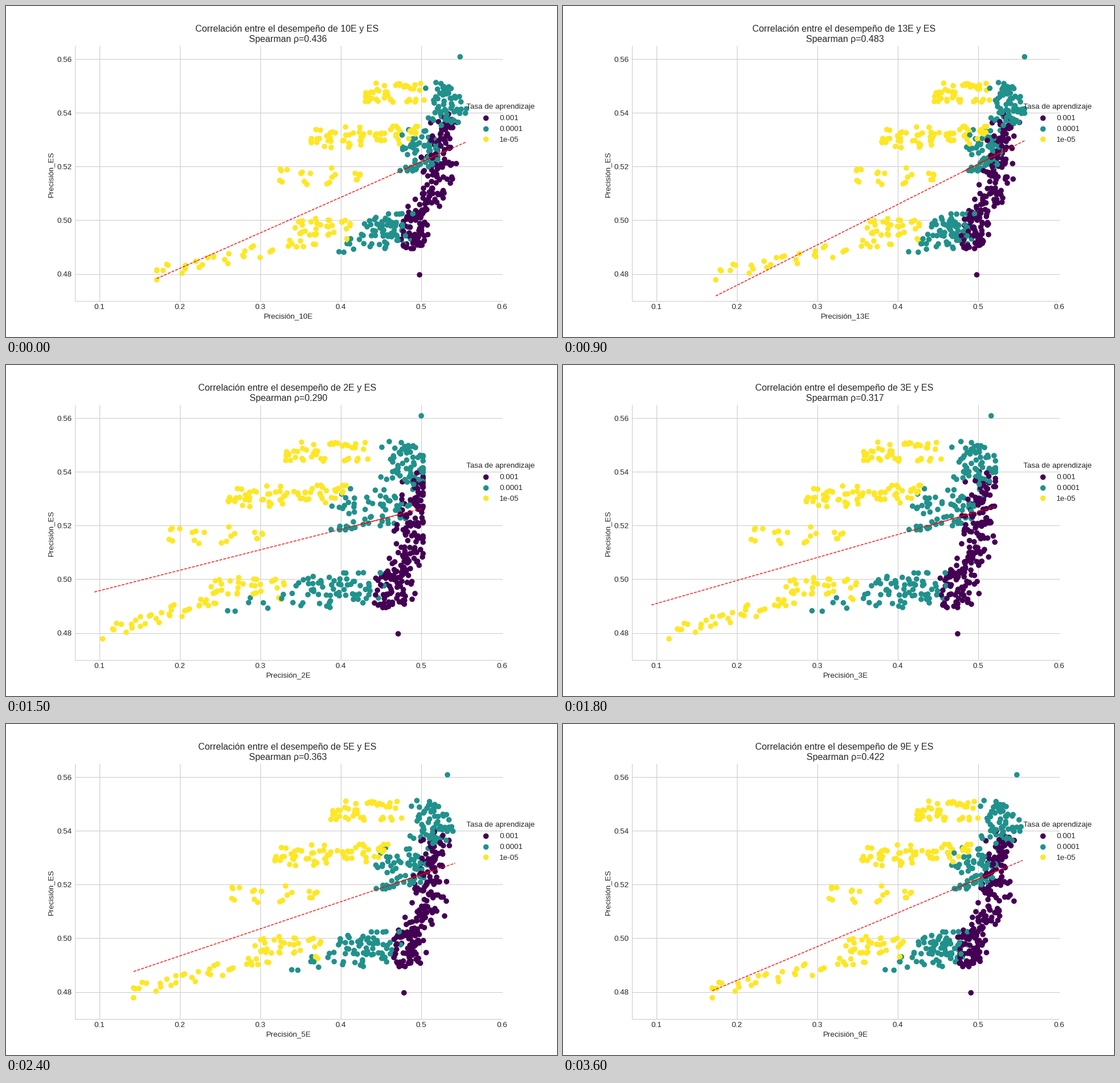
These frames come from a looping animation (966 by 580 pixels, 3900 ms). A matplotlib script:

```python
import numpy as np
import matplotlib.pyplot as plt
from matplotlib.animation import FuncAnimation

W, H, DPI = 966, 580, 96
INK, GRID = "#262626", "#cccccc"
PURPLE, TEAL, YELLOW = "#440154", "#21918c", "#fde725"
EPOCHS = [10, 11, 12, 13, 1, 2, 3, 4, 5, 6, 7, 8, 9]
RHO = [.255, .290, .317, .342, .363, .378, .390, .407, .422, .436, .452, .468, .483]

# Per colour: x spread, wobble between epochs, slowness of learning
STYLE = {PURPLE: (16, 5, .27), TEAL: (14, 2.5, .45), YELLOW: (8, 1, .75)}

# Bands: colour, clusters, dots in each, x of the first and last cluster at
# epoch 1 and at epoch 13, y of the first and last cluster, y spread
BANDS = [
    (YELLOW, 6, 7, (425, 575), (652, 738), (152, 152), 17),
    (YELLOW, 7, 9, (338, 530), (563, 735), (234, 222), 18),
    (YELLOW, 4, 5, (225, 378), (518, 645), (300, 298), 15),
    (YELLOW, 4, 8, (330, 437), (545, 615), (389, 393), 18),
    (YELLOW, 12, 3, (165, 320), (275, 575), (468, 412), 12),
    (TEAL, 4, 2, (255, 390), (610, 640), (425, 415), 15),
    (TEAL, 5, 13, (445, 592), (658, 705), (396, 392), 30),
    (TEAL, 5, 13, (490, 645), (720, 760), (255, 240), 35),
    (TEAL, 5, 13, (605, 672), (765, 795), (168, 178), 36),
    (PURPLE, 5, 15, (590, 655), (712, 728), (397, 385), 36),
    (PURPLE, 4, 14, (640, 648), (738, 765), (345, 295), 20),
    (PURPLE, 5, 13, (638, 648), (762, 778), (282, 208), 24),
]

plt.rcParams["font.family"] = "Liberation Sans"
rng = np.random.default_rng(12)
dots, colors, wobble = [], [], []


def add_dot(color, x1, x13, y, dx=0.0):
    _, shake, slow = STYLE[color]
    dots.append((x1, x13, y, dx, slow * (1 + y / 600)))
    colors.append(color)
    wobble.append(rng.normal(0, shake, 13))


for color, clusters, count, x1, x13, y, sy in BANDS:
    spread = STYLE[color][0]
    for a, b, c in zip(*(np.linspace(*r, clusters) for r in (x1, x13, y))):
        for _ in range(count):
            dx = np.clip(rng.normal(0, .65), -1.3, 1.3) * spread
            add_dot(color, a, b, c + rng.uniform(-sy, sy), dx)
add_dot(TEAL, 649, 809, 89)
add_dot(PURPLE, 645, 722, 471)

order = rng.permutation(len(dots))
X1, X13, Y, DX, POWER = np.array(dots)[order].T
wobble = np.array(wobble)[order]
colors = [colors[k] for k in order]


def trend(epoch):
    """End points of the regression line."""
    left = 155 + 114 * (1 - np.exp(-.46 * max(0, epoch - 3)))
    right = 690 + 120 * (1 - np.exp(-.42 * (epoch - 1)))
    left_y = np.interp(epoch, [1, 3, 7, 13], [375, 420.5, 447, 508])
    right_y = 257 - 21 * np.log(epoch) / np.log(13)
    return np.array([left, right]), np.array([left_y, right_y])


def dots_x(epoch):
    """Dots drift right along a flattening learning curve."""
    s = np.log(epoch) / np.log(13)
    x = X1 + (X13 - X1) * s ** POWER + DX * (1.6 - .6 * s)
    return np.clip(x + wobble[:, epoch - 1], *trend(epoch)[0])


fig = plt.figure(figsize=(W / DPI, H / DPI), dpi=DPI, facecolor="white")
ax = fig.add_axes([0, 0, 1, 1])
ax.set(xlim=(0, W), ylim=(H, 0))
ax.axis("off")


def label(x, y, s, pt=10, ha="center"):
    return ax.text(x, y + pt * .48, s, size=pt, color=INK, ha=ha, va="baseline")


def rule(x, y):
    ax.plot(x, y, color=GRID, lw=.8, zorder=1)


for k in range(6):
    x = 163.5 + 141.2 * k
    if k < 5:
        rule([x, x], [69.5, 516])
    label(x, 526, f"{.1 * (k + 1):.1f}")
for k in range(5):
    y = 469.7 - 94.25 * k
    rule([121, 869.5], [y, y])
    label(116, y, f"{.48 + .02 * k:.2f}", ha="right")
rule([121, 121, 869.5], [69.5, 516.5, 516.5])

ax.text(78.5, 295, "Precisión_ES", size=10, color=INK, rotation=90,
        ha="center", va="center")
label(867, 175.5, "Tasa de aprendizaje")
for k, (name, color) in enumerate(
        [("0.001", PURPLE), ("0.0001", TEAL), ("1e-05", YELLOW)]):
    ax.scatter([841], [196 + 18.7 * k], s=52, c=color, lw=0, zorder=5)
    label(865, 195.5 + 18.7 * k, name, ha="left")

title = label(492.7, 39, "", 12)
subtitle = label(494.7, 57, "", 12)
xlabel = label(495, 542.5, "")
cloud = ax.scatter(X1, Y, s=52, c=colors, lw=0, zorder=2)
dashed, = ax.plot([], [], "--", color="red", lw=1, zorder=3)
solid, = ax.plot([], [], "-", color="red", lw=1, zorder=3)


def draw(i):
    epoch = EPOCHS[i]
    title.set_text(f"Correlación entre el desempeño de {epoch}E y ES")
    subtitle.set_text(f"Spearman ρ={RHO[epoch - 1]:.3f}")
    xlabel.set_text(f"Precisión_{epoch}E")
    cloud.set_offsets(np.column_stack([dots_x(epoch), Y]))
    x, y = trend(epoch)
    dashed.set_data(x, y)
    # The dashes merge where the dots are dense
    part = np.array([.8, .93])
    solid.set_data(x[0] + part * (x[1] - x[0]), y[0] + part * (y[1] - y[0]))
    return title, subtitle, xlabel, cloud, dashed, solid


anim = FuncAnimation(fig, draw, frames=len(EPOCHS), interval=300,
                     repeat=True, repeat_delay=0, blit=False)
plt.show()
```
